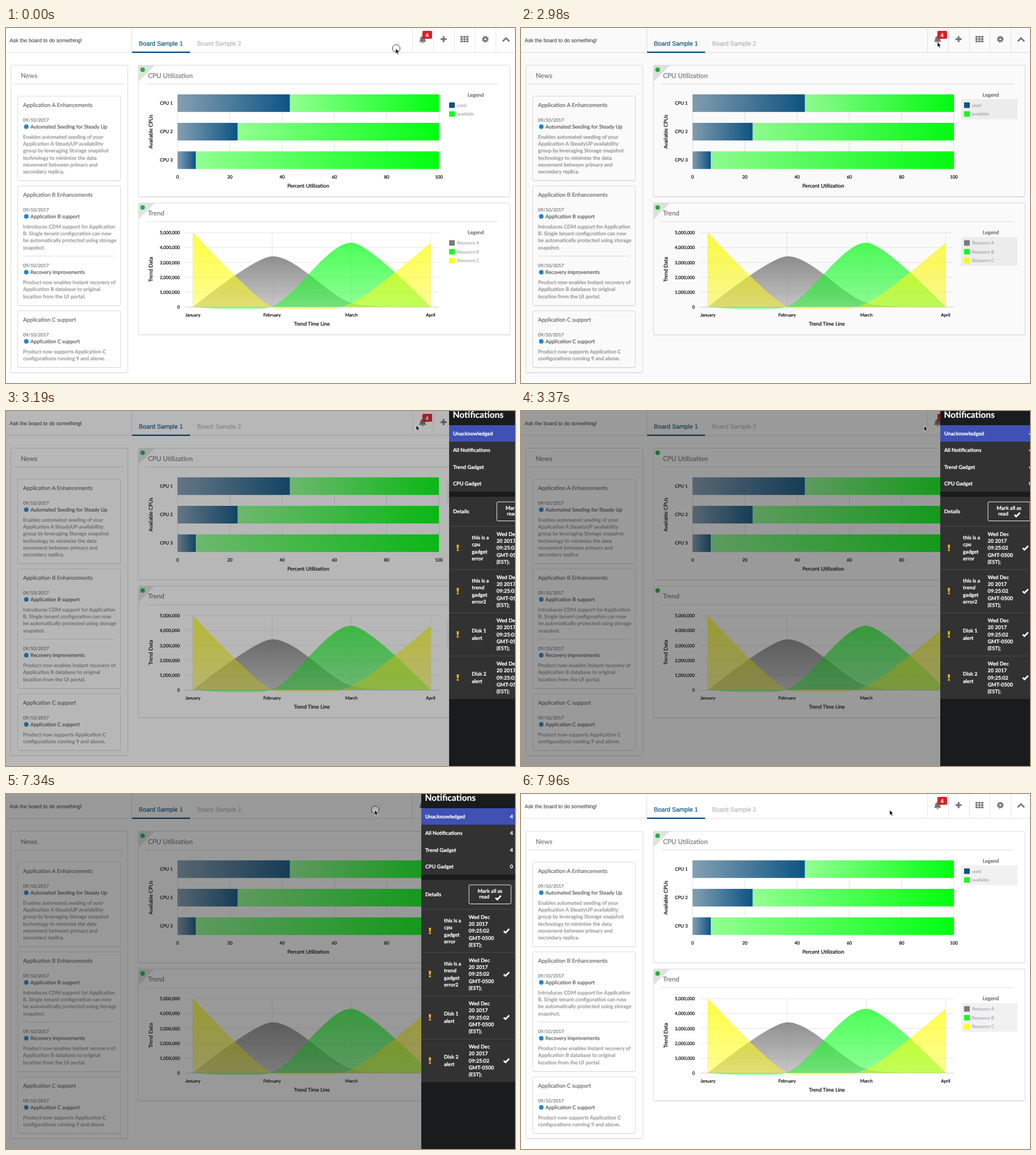
Recreate the animation shown at these times as an HTML page. Size 896 by 625 pixels, loop 8000 ms.

```html
<!DOCTYPE html>
<html lang="en">
<head>
<meta charset="utf-8">
<title>Board</title>
<style>
html, body { margin: 0; width: 100%; height: 100%; overflow: hidden; background: #fff; }
svg { display: block; width: 896px; height: 625px; font-family: Lato, sans-serif; text-rendering: geometricPrecision; }
text { stroke-width: .2px; }
.sans { font-family: "Liberation Sans", Arial, sans-serif; }
</style>
</head>
<body>
<svg id="stage" viewBox="0 0 896 625" xmlns="http://www.w3.org/2000/svg"></svg>
<script>
const LOOP = 8000, OPEN_LEFT = 731, CLOSED_LEFT = 900;

const text = (x, y, str, size, fill, extra = '') =>
  `<text x="${x}" y="${y}" font-size="${size}" fill="${fill}" stroke="${fill}" ${extra}>${str}</text>`;
const rect = (x, y, w, h, fill, extra = '') =>
  `<rect x="${x}" y="${y}" width="${w}" height="${h}" fill="${fill}" ${extra}/>`;
const line = (x1, y1, x2, y2, stroke = '#ddd') =>
  `<path d="M${x1} ${y1}L${x2} ${y2}" stroke="${stroke}"/>`;
const dot = (x, y, r, fill) => `<circle cx="${x}" cy="${y}" r="${r}" fill="${fill}"/>`;
const lines = (x, y, step, list, size, fill, extra) =>
  list.map((s, i) => text(x, y + i * step, s, size, fill, extra)).join('');
const card = (x, y, w, h) =>
  rect(x + .5, y + 1.5, w, h, '#e2e2e2', 'rx="2"') +
  rect(x + .5, y + .5, w, h, '#fff', 'rx="2" stroke="#dadada"');
const check = (x, y) =>
  `<path transform="translate(${x} ${y})" d="M-4.8 .3L-1.7 3.2 4.8-3.4" fill="none" stroke="#fff" stroke-width="2.8"/>`;
const BOLD = 'font-weight="700" ', MID = 'text-anchor="middle" ', END = 'text-anchor="end" ';

const gradient = (id, box, from, to, a = 1, b = 1) =>
  `<linearGradient id="${id}" ${box}><stop stop-color="${from}" stop-opacity="${a}"/>` +
  `<stop offset="1" stop-color="${to}" stop-opacity="${b}"/></linearGradient>`;
const DOWN = 'x2="0" y2="1"';
const defs = '<defs>' +
  gradient('used', '', '#849fb2', '#0d5484') +
  gradient('free', '', '#92ff92', '#00ff10') +
  gradient('gray', DOWN, '#777', '#777', .82, .4) +
  gradient('green', DOWN, '#10ff20', '#10ff20', .75, .45) +
  gradient('yellow', DOWN, '#ffff10', '#fffa10', .8, .42) +
  `<clipPath id="plot">${rect(315, 355, 447, 139.5, '#000')}</clipPath></defs>`;

function header() {
  const cells = [715.5, 752.5, 789.5, 825.5, 862.5];
  let grid = '';
  for (let i = 0; i < 9; i++) grid += rect(800 + i % 3 * 5, 14 + Math.floor(i / 3) * 4, 4, 3.1, '#777');
  return rect(0, 0, 896, 43, '#fff') +
    rect(716, 0, 36, 43, '#f2f2f2', 'id="hover"') +
    line(0, 43, 896, 43) + line(221.5, 0, 221.5, 43) +
    cells.map(x => line(x, 0, x, 43, '#e4e4e4')).join('') +
    rect(222, 41.5, 102, 2.5, '#0c5080') +
    text(6.5, 25, 'Ask the board to do something!', 9.2, '#555', 'class="sans"') +
    text(234, 31, 'Board Sample 1', 10.8, '#0c5080', 'class="sans"') +
    text(336.5, 31, 'Board Sample 2', 10.8, '#b4b4b4', 'class="sans"') +
    `<path transform="translate(733.5 20)" fill="#777" d="M-6.5 4.6C-4.2 2.5-4.8-.6-4.2-2.6-3.6-4.6-1.6-5.2-.8-5.4V-6.4H.8V-5.4C1.6-5.2 3.6-4.6 4.2-2.6 4.8-.6 4.2 2.5 6.5 4.6ZM-1.9 5.2H1.9C1.6 7.4-1.6 7.4-1.9 5.2Z"/>` +
    rect(733, 5, 17, 14, '#d8232a', 'rx="2"') + text(741.3, 15.5, '4', 9.5, '#fff', MID + BOLD) +
    rect(765, 18, 10.6, 3.2, '#777') + rect(768.7, 14.3, 3.2, 10.6, '#777') + grid +
    '<g transform="translate(843.7 19.7)" fill="none" stroke="#777"><circle r="3.3" stroke-width="3"/>' +
    '<circle r="5" stroke-width="2" stroke-dasharray="1.96"/></g>' +
    '<path d="M874.5 23.5L880.2 17.8 886 23.5" fill="none" stroke="#777" stroke-width="2.8"/>';
}

const article = (y, title, step, body) =>
  text(30, y, '09/10/2017', 8.2, '#777') + dot(35.7, y + 9, 4, '#1f86d0') +
  text(43, y + 12, title, 9.1, '#555') + lines(30, y + 30, step, body, 9.1, '#a0a0a0', BOLD);

function news() {
  const head = (y, s) => text(30, y, s, 9.75, '#666');
  return card(8, 65, 206, 541) + text(26, 87.7, 'News', 11.8, '#777') + line(13, 98.5, 208, 98.5) +
    card(20, 119.5, 181, 148.5) + head(138.5, 'Application A Enhancements') +
    article(164.7, 'Automated Seeding for Steady Up', 12.3, ['Enables automated seeding of your',
      'Application A SteadyUP availability', 'group by leveraging Storage snapshot',
      'technology to minimize the data', 'movement between primary and', 'secondary replica.']) +
    card(20, 277.5, 181, 210.5) + head(296.5, 'Application B Enhancements') +
    article(322.7, 'Application B support', 12.3, ['Introduces CDM support for Application',
      'B. Single tenant configuration can now', 'be automatically protected using storage', 'snapshot.']) +
    line(30, 401.5, 191, 401.5) +
    article(421, 'Recovery improvements', 12.3, ['Product now enables Instant recovery of',
      'Application B database to original', 'location from the UI portal.']) +
    card(20, 497.5, 181, 99.5) + head(516.5, 'Application C support') +
    article(542.7, 'Application C support', 12.3, ['Product now supports Application C',
      'configurations running 9 and above.']);
}

const panel = (y, h, title, legend) =>
  card(232.5, y, 654, h) +
  `<path class="fold" d="M233 ${y + .5}h29l-29 29z" fill="#e2e2e2"/>` +
  dot(240.5, y + 8.5, 4, '#1cb53c') + text(250, y + 22.7, title, 11.65, '#777') +
  line(246, y + 33.5, 867, y + 33.5) + text(827, y + 55.5, 'Legend', 9, '#777', MID + BOLD) +
  rect(775, y + 60.5, 99, 4 + 15.6 * legend.length, '#f1f1f1', 'class="tint"') +
  legend.map(([name, fill], i) => rect(780, y + 66 + i * 15.6, 10, 9.7, fill, 'rx="1"') +
    text(794, y + 73.7 + i * 15.6, name, 7.9, '#a8a8b0')).join('');

const axisTitle = (x, y, s) =>
  text(0, 0, s, 9.1, '#000', `${MID} transform="translate(${x} ${y}) rotate(-90)"`);

function cpuPanel() {
  let out = panel(65, 231.5, 'CPU Utilization', [['used', '#0d5484'], ['available', '#10ff20']]);
  for (let v = 0; v <= 100; v += 20) {
    const x = 302 + v * 4.6;
    out += line(x, 117, x, 248, '#e0e0e0') + text(x, 265, v, 7.9, '#000', MID);
  }
  [43, 23, 7].forEach((used, i) => {
    const y = 116.8 + i * 50.2, split = used * 4.6;
    out += rect(302, y, split, 31, 'url(#used)') + rect(302 + split, y, 460 - split, 31, 'url(#free)') +
      text(293.5, y + 18.2, 'CPU ' + (i + 1), 7.9, '#000', END);
  });
  return out + text(532, 281, 'Percent Utilization', 9.1, '#000', MID) + axisTitle(258, 182.5, 'Available CPUs');
}

// Area under a cardinal spline (tension 0.7) with quadratic end pieces.
function area(fill, [y0, y1, y2, y3]) {
  const step = 139.5, x = i => 329 + i * step, k = .15;
  const dx = 2 * step * k, d1 = (y2 - y0) * k, d2 = (y3 - y1) * k, end = 2 / 3;
  return `<path fill="url(#${fill})" d="M${x(0)} ${y0}` +
    `Q${x(1) - dx * end} ${y1 - d1 * end} ${x(1)} ${y1}` +
    `C${x(1) + dx} ${y1 + d1} ${x(2) - dx} ${y2 - d2} ${x(2)} ${y2}` +
    `Q${x(2) + dx * end} ${y2 + d2 * end} ${x(3)} ${y3}V491H${x(0)}Z"/>`;
}

function trendPanel() {
  let out = panel(307.5, 232, 'Trend',
    [['Resource A', '#7c7c7c'], ['Resource B', '#10ff20'], ['Resource C', '#ffff10']]);
  for (let i = 0; i <= 5; i++) {
    const y = 491.3 - i * 26.2;
    out += line(315, y, 762, y, i ? '#e6e6e6' : '#ccc') +
      text(306, y + 2.8, (i * 1e6).toLocaleString('en-US'), 7.8, '#000', END);
  }
  ['January', 'February', 'March', 'April'].forEach((m, i) => {
    const x = 329 + i * 139.5;
    out += line(x, 360, x, 491, '#e6e6e6') + text(x, 508, m, 7.9, '#000', MID);
  });
  return out + '<g clip-path="url(#plot)">' +
    area('gray', [491, 402, 484, 491]) +
    area('green', [491, 490, 378, 491]) +
    area('yellow', [360, 491, 484.5, 378]) + '</g>' +
    text(538.5, 523.5, 'Trend Time Line', 9.1, '#000', MID) + axisTitle(258, 425, 'Trend Data');
}

function drawer() {
  const white = (x, y, s, extra = '') => text(x, y, s, 9.1, '#fff', BOLD + extra);
  const menu = [['Unacknowledged', 4], ['All Notifications', 4], ['Trend Gadget', 4], ['CPU Gadget', 0]];
  const alerts = [['this is a', 'cpu', 'gadget', 'error'], ['this is a', 'trend', 'gadget', 'error2'],
    ['Disk 1', 'alert'], ['Disk 2', 'alert']];
  const date = ['Wed Dec', '20 2017', '09:25:02', 'GMT-0500', '(EST);'];
  const block = (x, mid, list) => lines(x, mid + 3.3 - (list.length - 1) * 6.2, 12.4, list, 9.1, '#fff', BOLD);
  return rect(0, 0, 180, 625, '#1a1b1d') +
    text(6.5, 12, 'Notifications', 15.5, '#fff', BOLD) +
    rect(0, 25, 180, 29, '#3f51b5') + rect(0, 54, 180, 88, '#323232') +
    menu.map(([s, n], i) => white(7, 43 + i * 29.4, s) + white(161.5, 43 + i * 29.4, n, END)).join('') +
    rect(0, 151, 180, 356, '#323232') + white(7, 179.7, 'Details') +
    rect(84, 160, 74, 33.5, 'none', 'rx="2" stroke="#eee"') +
    white(121, 174, 'Mark all as', MID) + white(102, 184.3, 'read') + check(135.5, 182.5) +
    alerts.map((msg, i) => {
      const mid = 241 + i * 76.1;
      return line(0, mid - 38, 180, mid - 38, '#4a4a4a') +
        `<path d="M13.2 ${mid - 5.5}h4l-.7 7h-2.6z" fill="#fcb814"/>` + rect(13.6, mid + 2.7, 3.2, 2.8, '#fcb814') +
        block(40, mid, msg) + block(83.5, mid, date) + check(150, mid);
    }).join('');
}

const stage = document.getElementById('stage');
stage.innerHTML = defs + rect(0, 0, 896, 625, '#fff') + header() + news() + cpuPanel() + trendPanel() +
  rect(0, 0, 896, 625, '#212121', 'id="dim"') + `<g id="drawer">${drawer()}</g>` +
  `<g id="cursor">
    <circle id="ring" cx="1" r="6.7" fill="#fff" fill-opacity=".25" stroke="#333"/>
    <path id="arrow" d="M0 0V9.2L2.1 7.3 3.6 10.7 5.2 10 3.7 6.7H6.5Z" fill="#000" stroke="#fff" stroke-width=".7"/>
    <path id="hand" d="M-1.2 6.6V1A1.1 1.1 0 0 1 1 1V4.6Q2-.1 4.3 1.3L3 4.4 4 5Q6.3 4.6 6 7.5L4.9 11.6H-.7L-3.4 7.5Q-3.6 5.6-1.2 6.6ZM1 4.4V7M2.8 4.7V7" fill="#fff" stroke="#111" stroke-width="1"/>
  </g>`;
const $ = id => document.getElementById(id);
const show = (el, on) => el.setAttribute('visibility', on ? 'visible' : 'hidden');

const move = (start, end, steps, from, to) => Array.from({ length: steps }, (_, i) => {
  const p = (i + 1) / steps;
  return [start + (end - start) * i / (steps - 1), from[0] + (to[0] - from[0]) * p, from[1] + (to[1] - from[1]) * p];
});
const pointer = [
  [0, 686, 36],
  ...move(390, 650, 4, [686, 36], [730, 27]),
  [910, 721, 31], [1000, 732, 29], [1090, 735, 27], [1450, 734.5, 26.5], [1630, 734.5, 25.5],
  [2980, 733, 24.5], [3070, 731, 24.5], [3190, 722, 25], [3370, 709.5, 26],
  [3760, 705.5, 26.5], [4030, 705, 26],
  ...move(4200, 4830, 8, [705, 26], [722, 41]),
  ...move(5100, 5820, 9, [722, 41], [657.5, 28.5]),
  ...move(5910, 6170, 4, [657.5, 28.5], [649, 28])
];
// [time, drawer left, dim]
const slide = [
  [0, CLOSED_LEFT, 0], [2980, CLOSED_LEFT, .02], [3070, 869.5, .11], [3190, 780, .32],
  [3370, 738, .45], [3580, OPEN_LEFT, .46],
  [7520, 780, .28], [7610, 878, .01], [7790, 893, 0], [7880, CLOSED_LEFT, 0]
];
const at = (keys, t) => keys.reduce((last, key) => key[0] <= t ? key : last);
const within = (t, a, b) => t >= a && t < b;

function render(t) {
  const [, x, y] = at(pointer, t), [, left, dim] = at(slide, t);
  const hand = within(t, 1000, 2980);
  $('cursor').setAttribute('transform', `translate(${x} ${y})`);
  show($('hand'), hand);
  show($('arrow'), !hand);
  show($('ring'), t < 180 || within(t, 2800, 2980) || within(t, 7340, 7520));
  show($('hover'), within(t, 910, 2980));
  $('drawer').setAttribute('transform', `translate(${left} 0)`);
  $('dim').setAttribute('opacity', dim);
  document.querySelectorAll('.tint').forEach(el => show(el, t >= 2980));
  document.querySelectorAll('.fold').forEach(el => show(el, !within(t, 3370, 3580)));
}

const begin = performance.now();
function tick() {
  render((performance.now() - begin) % LOOP);
  requestAnimationFrame(tick);
}
tick();
</script>
</body>
</html>
```
